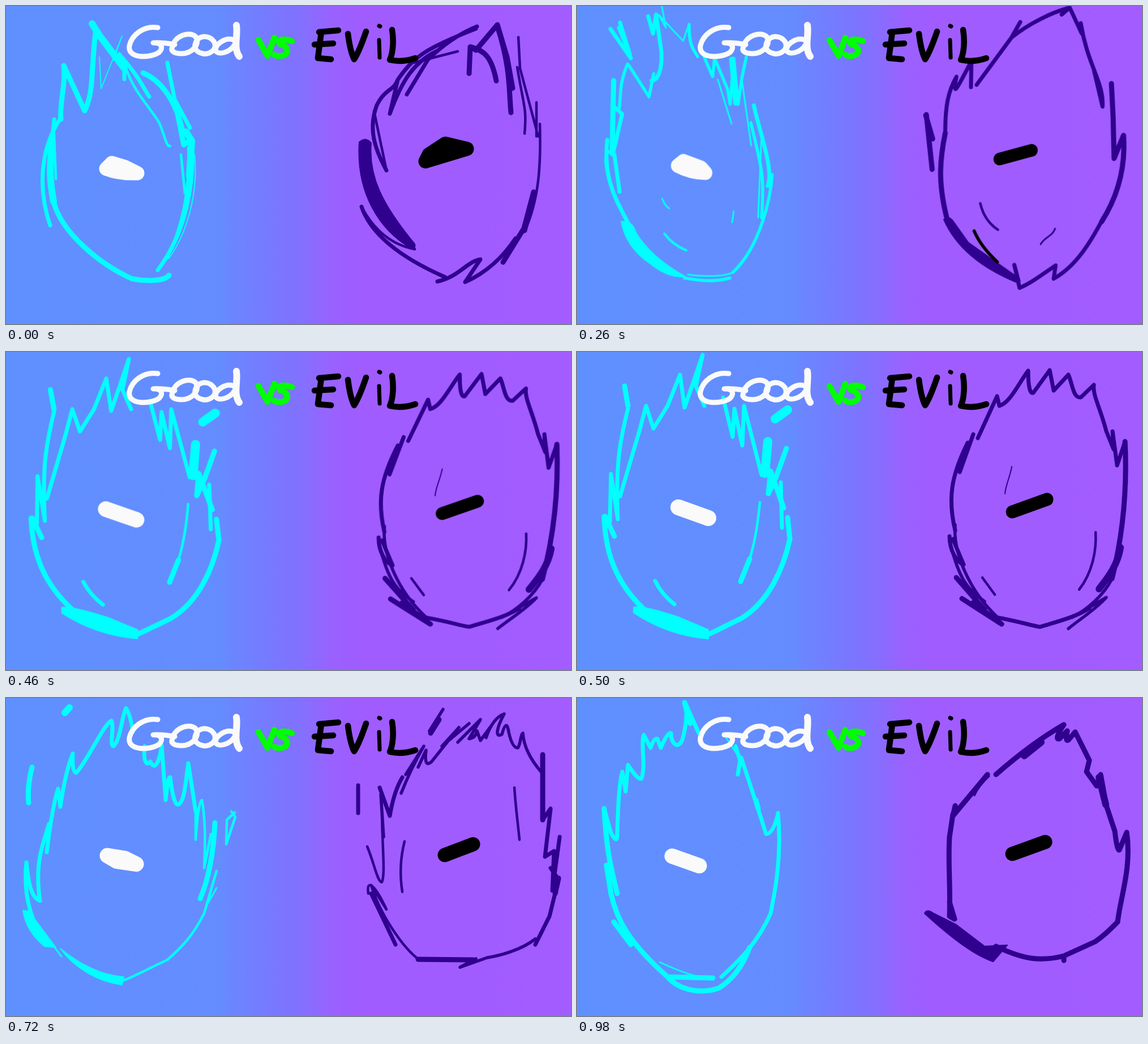
An HTML page without scripts that plays this animation: 998 px wide and 561 px high, repeating every 1000 ms.

```html
<!DOCTYPE html>
<html lang="en">
<head>
<meta charset="utf-8">
<title>Good vs Evil</title>
<style>
html,body{margin:0;width:100%;height:100%;overflow:hidden;background:#7d72ff}
svg{display:block;width:100vw;height:100vh}
path{fill:none;stroke:currentColor;stroke-width:7;stroke-linecap:round;stroke-linejoin:round}
.w2{stroke-width:2}.w3{stroke-width:3}.w4{stroke-width:4.5}.w5{stroke-width:5.5}
.w9{stroke-width:9}.w10{stroke-width:10.5}.w12{stroke-width:12}.w16{stroke-width:16}
.fill{fill:currentColor;stroke-width:2}
.eye{fill:currentColor;stroke-width:25}
.good{color:#0ff;--d:1;transform-origin:205px 490px}
.evil{color:#30008f;--d:-1;transform-origin:800px 480px}
.good .eye{color:#fafafa}
.evil .eye,.black{color:#000}
.white{color:#fafafa}.green{color:#0f0}

.pose{opacity:0;animation:1s step-end infinite}
.p0{animation-name:p0}.p1{animation-name:p1}.p2{animation-name:p2}.p3{animation-name:p3}
.p4{animation-name:p4}.p5{animation-name:p5}.p6{animation-name:p6}
@keyframes p0{0%{opacity:1}10%,100%{opacity:0}}
@keyframes p1{0%{opacity:0}10%{opacity:1}28%,100%{opacity:0}}
@keyframes p2{0%{opacity:0}28%{opacity:1}44%,100%{opacity:0}}
@keyframes p3{0%{opacity:0}44%{opacity:1}60%,100%{opacity:0}}
@keyframes p4{0%{opacity:0}60%{opacity:1}80%,100%{opacity:0}}
@keyframes p5{0%{opacity:0}80%{opacity:1}94%,100%{opacity:0}}
@keyframes p6{0%{opacity:0}94%,100%{opacity:1}}

/* the outlines boil between the main poses */
.good,.evil{animation:boil 1s step-end infinite}
@keyframes boil{
0%,18%,38%,50%,72%,88%,98%,100%{transform:none}
2%,10%,26%,32%,40%,54%,62%,68%,78%,86%,96%{transform:skewX(calc(var(--d)*1deg)) scaleY(1.015)}
4%,12%,20%,34%,42%,48%,58%,66%,76%,84%,94%{transform:skewX(calc(var(--d)*-1deg)) scale(1.015,.99)}
6%,14%,22%,28%,44%,52%,60%,70%,80%,90%{transform:translate(calc(var(--d)*2px),-2px) scale(.99,1.01)}
8%,16%,24%,30%,36%,46%,56%,64%,74%,82%,92%{transform:skewX(calc(var(--d)*.6deg)) scale(1.01,.985)}
}
</style>
</head>
<body>
<svg viewBox="0 0 998 561" preserveAspectRatio="none" role="img" aria-label="Good vs Evil">
<defs>
<linearGradient id="sky">
<stop offset="0" stop-color="#5f90ff"/><stop offset=".38" stop-color="#658cff"/>
<stop offset=".4" stop-color="#6b86ff"/><stop offset=".5" stop-color="#7d73ff"/>
<stop offset=".525" stop-color="#8470ff"/><stop offset=".58" stop-color="#9a61ff"/>
<stop offset=".63" stop-color="#a05cff"/><stop offset="1" stop-color="#a25cff"/>
</linearGradient>
</defs>
<rect width="998" height="561" fill="url(#sky)"/>

<g class="pose p0">
<g class="good">
<path class="w12" d="M152,31L165,52L209,110M81,250C76,290 78,310 84,345M318,222L328,238L324,300"/>
<path class="w9" d="M158,48C150,110 156,150 139,185L102,105C106,140 94,170 97,200M84,345C98,400 165,455 222,481C245,486 280,486 288,475M242,118C270,130 298,160 312,220M300,175L314,245L328,235"/>
<path d="M95,200C62,250 55,320 78,387M85,200C80,260 74,300 84,345M200,85C235,125 240,140 253,160M209,110V129M285,100L298,165L325,215M328,235C334,310 318,400 268,466"/>
<path class="w4" d="M84,200L88,305M212,110C225,150 255,180 270,205C280,225 283,250 290,247M322,250C325,330 310,390 285,445M309,262L316,330"/>
<path class="w2" d="M165,90L168,146L205,53L190,95M333,262C340,330 320,400 288,445"/>
<path class="eye" d="M177,287Q200,296 232,295L210,284L187,277Z"/>
</g>
<g class="evil">
<path class="fill" d="M624,240Q636,230 645,242C640,300 664,350 722,420Q724,430 715,427C660,395 618,330 624,240Z"/>
<path class="w4" d="M628,354C655,405 690,423 722,429M943,208C945,280 942,340 916,398M903,108C915,180 920,180 916,225M905,55L908,110L940,230M937,170V230M650,185L672,290M720,100L798,80"/>
<path d="M628,354C645,405 700,445 775,478M762,486C800,478 815,450 838,447L811,487C850,470 880,440 900,410M655,175C640,215 650,250 672,290M655,175C670,145 685,150 692,130L678,190C700,130 720,100 760,80M692,130C720,90 740,75 830,40M708,156L745,95C780,60 810,45 832,36"/>
<path class="w9" d="M878,452L915,392L932,328L916,396M818,119L820,72L830,78L868,33L885,90L895,145M866,132C858,90 845,78 820,72M892,188C888,150 892,110 868,36"/>
<path class="eye" d="M741,274L814,252L776,243L747,262Z"/>
</g>
</g>

<g class="pose p1">
<g class="good">
<path d="M67,47L102,98L84,36L100,90L82,45M68,180L85,195L68,262M134,25L142,55L148,22L156,85C158,120 148,137 138,137M318,180C325,220 352,290 340,320M58,240C48,310 75,350 95,390M70,265L78,330"/>
<path class="w9" d="M71,137L66,264M280,100L286,176"/>
<path class="w5" d="M98,110L133,165L142,125M96,108C80,145 84,160 80,185M206,40C205,80 215,85 220,95M230,92L246,130L250,98L272,152L276,178L284,98L290,178L298,130L306,96M312,210C330,290 335,300 328,375M348,300C345,340 325,425 276,470M270,480C240,488 215,484 190,480M66,262C48,250 52,310 80,360"/>
<path class="w3" d="M158,6L165,45L152,22L195,68L206,38M255,135L278,212M298,140L312,250M330,240L322,375M276,470C260,478 220,478 196,474M279,364L276,383M153,342Q158,355 165,359"/>
<path class="w4" d="M156,403Q170,422 194,432"/>
<path class="fill" d="M80,382Q100,380 105,400C125,435 160,460 192,478Q160,480 130,455C100,435 85,410 80,382Z"/>
<path class="eye" d="M182,285Q205,297 230,297L222,288L192,277Z"/>
</g>
<g class="evil">
<path class="w9" d="M612,196L624,291M611,197L624,238M646,228C636,280 635,320 654,385M938,142L942,200L945,272L961,232C967,300 945,350 925,382"/>
<path d="M646,228C645,180 650,155 664,130C656,175 670,140 690,103V148M775,35L760,62L700,144M760,62C790,38 830,18 862,10L848,22M862,10L884,55L882,37C895,110 925,140 923,182L907,120M928,375C905,420 880,460 842,481L845,458C820,475 800,490 782,497L772,457L780,485"/>
<path class="fill" d="M646,378Q655,370 664,383L690,418L780,480L778,488C720,465 670,430 646,378Z"/>
<path class="w4" d="M710,350C715,370 725,385 742,396"/>
<path class="w3" d="M818,421C825,408 838,408 843,394"/>
<path class="black w5" d="M700,398Q712,425 742,452"/>
<path class="eye" d="M743,273L799,258" style="stroke-width:22"/>
</g>
</g>

<g class="pose p2">
<g class="good">
<path class="w12" d="M68,-2L77,16M65,66L70,80M64,183L76,225M82,272L92,300M355,225L345,300M62,345L88,400M94,440L120,456"/>
<path d="M76,195L78,140L86,160Q82,115 90,120L104,148L120,118L138,150Q150,150 149,120L146,55M296,112L300,160L308,115L312,180L316,125L322,190L330,132L330,200L340,140L347,205M362,220C365,300 345,400 312,458M74,235C80,300 75,350 92,400C110,440 150,450 175,468M128,328C128,355 132,380 142,400"/>
<path class="w5" d="M146,55L156,100Q170,65 177,57L186,90L212,122L208,40L224,105L240,70L255,100L264,50L270,95L296,112M280,252C286,280 282,310 276,340M294,376C295,400 282,425 264,438M358,300C358,370 340,420 320,440"/>
<path class="w9" d="M345,170L352,218M362,235L340,310L355,310L345,370M352,330C342,400 300,470 200,498M86,440C130,470 160,490 200,499L258,500M90,415L175,468M64,183L80,240L78,145M66,185C72,230 80,270 97,312M54,298C62,360 85,400 110,430"/>
<path class="w4" d="M164,210C148,235 142,270 143,302"/>
<path class="eye" d="M190,282L222,293"/>
</g>
<g class="evil">
<path class="w12" d="M776,15L781,11M591,95L593,133M940,382L882,438"/>
<path class="w9" d="M702,33L690,76M972,218C975,280 955,350 928,400M634,205C638,250 645,290 666,346M692,446C730,460 790,490 825,498L845,492M942,380C920,420 880,460 826,486M926,115L934,142"/>
<path d="M966,25L950,102M638,215L658,150L665,195C680,150 705,125 722,110L728,133L790,45L768,82C795,92 815,45 828,48C842,52 816,80 830,82C845,82 858,52 870,52C878,55 862,78 878,80C892,80 898,55 908,55L915,95L934,140M634,238L660,335M634,303C640,330 660,360 668,395L636,355C655,400 670,420 695,458L665,425"/>
<path class="w4" d="M940,112L958,205L967,240M757,350C760,375 768,395 776,414"/>
<path class="w2" d="M717,170C708,180 698,205 702,234C708,215 712,195 717,170M893,225C895,270 892,300 885,330"/>
<path class="eye" d="M764,277L817,259" style="stroke-width:22"/>
</g>
</g>

<g class="pose p3">
<g class="good">
<path d="M90,100C75,160 68,200 72,295L60,215L58,300M76,255L110,140L122,95L135,135L160,95L182,40L190,98L222,5L210,60L225,95M258,80L275,150L278,100L292,165L295,95L326,217M360,230L362,310M138,404Q150,428 172,445"/>
<path class="w9" d="M84,60L90,95M370,170L352,220L338,250L342,210L365,275M372,292L376,330C365,380 340,440 290,470C265,482 240,495 232,498M48,290C50,370 80,420 125,460M50,290L66,325M305,365L289,405"/>
<path class="w16" d="M337,158L332,214M350,118L372,102"/>
<path class="w4" d="M323,265C318,320 310,355 294,398"/>
<path class="fill" d="M100,450Q120,448 180,468L232,490V506Q160,500 100,460Z"/>
<path class="eye" d="M179,274L232,293" style="stroke-width:28"/>
</g>
<g class="evil">
<path d="M708,152L742,78L746,95C765,90 780,55 797,33C797,50 798,75 806,72L835,32L842,68L868,40C875,55 876,82 890,80L913,58C910,75 925,100 935,140L948,172L946,140L954,200L968,158M700,145L676,212L690,160C660,220 655,260 668,315M658,325C658,350 670,370 683,375L664,330M740,468C780,475 800,482 818,485C850,475 880,468 905,452"/>
<path class="w9" d="M968,158C972,240 965,320 945,400M670,398L720,455M680,435L750,480L700,442"/>
<path class="w12" d="M960,345C955,375 940,395 922,418"/>
<path class="w5" d="M945,400C930,430 900,455 875,468L935,433C915,455 890,470 868,488M660,340C675,400 690,420 720,440M668,305C664,350 690,420 745,470"/>
<path class="w4" d="M716,398L738,428M916,318C918,350 910,390 887,419"/>
<path class="w2" d="M768,202C765,220 757,235 756,250"/>
<path class="eye" d="M769,282L830,260" style="stroke-width:23"/>
</g>
</g>

<g class="pose p4">
<g class="good">
<path class="w12" d="M104,26L112,17"/>
<path class="w9" d="M46,122C41,140 38,165 40,185M369,220C367,270 358,320 343,354"/>
<path d="M78,222L72,272Q82,190 92,160L96,192Q105,130 118,98Q116,130 124,132C145,110 170,50 186,40C192,50 182,85 190,85C202,75 205,30 212,18Q220,30 224,60M245,85C242,110 248,122 255,112C262,128 270,118 275,84L282,180Q286,138 290,140Q296,190 304,188C316,185 318,140 322,115L335,200M36,290C40,330 45,352 60,358C50,290 65,260 76,222M36,290C30,350 45,400 75,435"/>
<path class="w4" d="M404,202L390,215L389,258L405,210L398,200M335,200L335,250Q340,180 346,180Q354,220 350,300L362,240M372,305L350,380C330,420 310,440 285,462C250,478 220,495 205,499"/>
<path class="w3" d="M80,432L98,456M355,365L372,335"/>
<path class="fill" d="M30,375L40,376L88,440L68,438Q36,412 30,375ZM96,442C130,470 170,490 208,492L205,506C160,500 120,475 96,442Z"/>
<path class="eye" d="M179,278L210,283L230,293L196,288Z" style="stroke-width:27"/>
</g>
<g class="evil">
<path d="M622,154V203M660,158L678,208Q685,165 700,140M948,215L962,195L952,280L968,270L965,340L978,245M962,300L976,320L960,385L935,435M645,345L688,435"/>
<path class="w5" d="M772,20L748,58M662,170L667,245M698,168Q715,125 738,85L706,135M728,122L742,92Q738,125 752,112L800,52L770,85L818,45M798,78L838,38L818,72Q830,70 832,58L838,75L858,48M848,70Q860,35 880,28C868,50 862,72 876,64Q884,35 888,60Q894,88 904,88C910,80 908,65 913,62Q915,95 945,130M935,425C910,445 870,455 850,458L802,475L830,460"/>
<path class="w9" d="M765,38L750,62M948,100V215M976,318L970,345M728,461L825,462"/>
<path class="w4" d="M638,262C650,290 656,325 664,325C670,310 665,270 664,205M640,345C636,320 650,325 672,373L645,330C660,380 700,440 730,462M704,253C697,280 695,310 700,342M898,158C900,190 904,220 907,250"/>
<path class="eye" d="M775,277L825,258"/>
</g>
</g>

<g class="pose p5">
<g class="good">
<path class="w12" d="M52,101V116M408,145L407,199M208,5V40"/>
<path class="w3" d="M376,297L379,313L387,310L388,326"/>
<path d="M64,232L72,152L78,200L105,110L110,130L132,70L140,85C160,65 185,40 210,12L218,60M328,75V105"/>
<path class="w5" d="M225,88L232,125L240,80L262,110L270,90L287,172L295,100L305,155L315,105L322,160L332,205L338,155L344,230L350,185"/>
<path class="w9" d="M350,185L346,230L351,285C345,350 340,390 320,425C290,460 230,485 205,508Q180,518 155,514M205,496C140,470 100,440 72,408C45,320 42,250 62,210M38,345C45,375 60,400 72,410"/>
<path class="fill" d="M36,345L48,348L74,405L68,410Z"/>
<path class="eye" d="M172,278Q200,280 223,297"/>
</g>
<g class="evil">
<path class="w12" d="M783,12L794,4M940,140L954,185"/>
<path d="M625,123L621,154M700,150C690,170 670,195 667,250M730,118L800,70L845,42L852,60L875,42L880,65L895,45L905,92M648,408L676,448L665,420L695,440L680,400L715,445L712,420L740,450M660,415C690,450 730,450 790,470L730,462L770,478"/>
<path class="w4" d="M705,150Q715,125 740,110L838,52M640,285L650,350C620,310 635,290 640,265"/>
<path class="w5" d="M668,225C640,260 628,300 650,355"/>
<path class="w9" d="M904,80L945,150L960,235M955,200L972,270C975,320 960,380 940,415L885,460L830,458L790,465M980,338L962,375M648,350C665,385 680,395 692,405L661,322"/>
<path class="fill" d="M658,320L700,393C730,425 770,445 800,462C750,458 705,428 665,360Z"/>
<path class="eye" d="M774,278L836,260"/>
</g>
</g>

<g class="pose p6">
<g class="good">
<path d="M48,195L60,238Q70,256 71,245C72,200 74,150 80,130L86,165L90,118Q108,146 114,142C122,120 112,80 118,65L130,88Q136,70 142,72L148,88Q160,60 166,62C166,80 178,92 186,74Q196,40 192,10L215,62M280,85L288,110L284,135L290,105L318,190L334,240Q346,240 355,205M355,203C362,280 350,340 342,380C320,430 290,460 255,492"/>
<path class="w9" d="M190,8L200,45M316,180L320,195M305,440C290,480 270,500 250,512C210,525 175,510 160,492L240,494M48,195C52,270 60,300 71,345M52,295L60,345C70,390 90,430 160,492M65,395L95,435"/>
<path class="w3" d="M258,62L290,110M146,466C180,482 210,492 232,495"/>
<path class="eye" d="M168,279L216,296" style="stroke-width:27"/>
</g>
<g class="evil">
<path class="w9" d="M668,190L664,208L725,135M740,135C780,100 820,70 860,47Q842,74 852,72L866,58Q862,78 868,74L880,60L905,110L900,130L918,155L925,135L935,190L950,235M950,235Q954,270 958,268L971,237C980,300 960,350 955,395C940,410 930,420 915,430L860,455V463M860,455C820,465 790,462 740,438M664,205L658,245C655,290 660,330 658,385L667,390L658,360"/>
<path class="w12" d="M922,140L934,188M790,102L820,78"/>
<path class="w3" d="M702,172C710,155 720,145 728,138"/>
<path class="fill" d="M614,380Q618,371 630,380L670,400L720,438L760,436L735,465Q690,450 614,380Z"/>
<path class="eye" d="M769,275L827,254"/>
</g>
</g>

<g class="white">
<path class="w9" d="M268,38C242,34 222,52 218,70C214,94 255,92 270,82C278,74 276,64 260,65Q275,64 298,68M294,72C298,52 324,44 335,54C344,68 328,84 310,84C298,84 290,80 294,72ZM334,68C338,50 360,50 368,64C374,78 358,86 348,84C338,82 332,76 334,68ZM402,60C390,54 370,66 370,78C374,88 396,82 404,68"/>
<path class="w12" d="M407,34C410,52 401,74 412,89"/>
</g>
<g class="green">
<path class="w10" d="M446,60L462,88L474,56M505,62C490,56 478,60 484,67C500,72 500,84 490,87Q480,90 474,86"/>
</g>
<g class="black">
<path class="w10" d="M557,46L551,91M553,46L587,43M545,68L578,66M551,92L574,94M604,49C606,65 610,84 615,94Q624,80 636,45M682,42C685,60 684,82 678,95Q700,100 723,92"/>
<path d="M659,35L661,36M659,60L660,91"/>
</g>
</svg>
</body>
</html>
```
